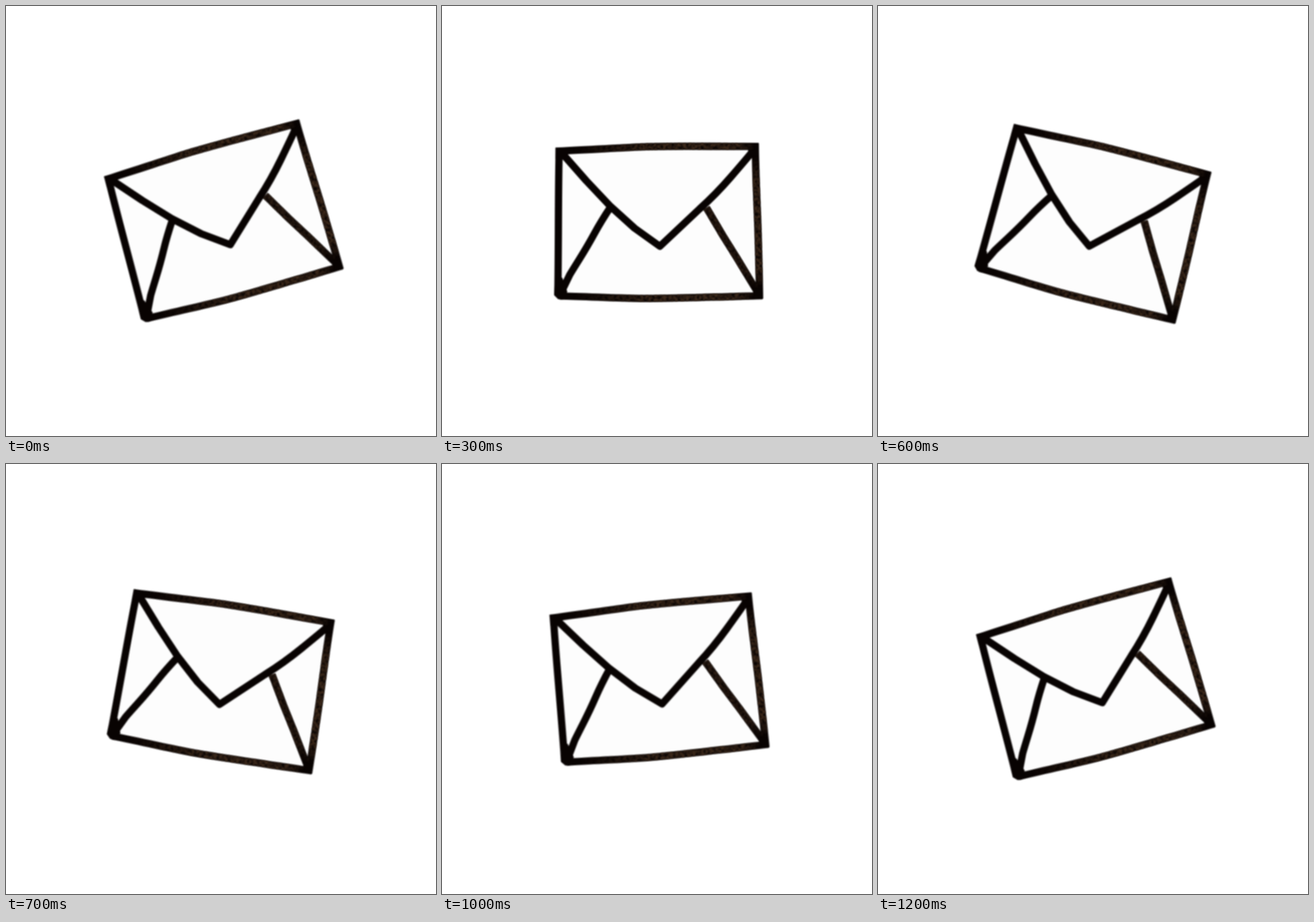
Animation of 748x748 px, one loop 1310 ms. Source, as an HTML page without scripts:

```html
<!DOCTYPE html>
<html lang="en">
<head>
<meta charset="utf-8">
<title>Rocking envelope</title>
<style>
  html, body { margin: 0; width: 100%; height: 100%; overflow: hidden; background: #fff; }
  svg { display: block; width: 100vw; height: 100vh; }
  .envelope {
    transform-origin: 374px 374px;
    animation: rock 1310ms steps(6, jump-end) infinite;
  }
  /* six 5-degree steps each way, then a short hold */
  @keyframes rock {
    0% { transform: rotate(-15deg); }
    45.77% { transform: rotate(15deg); }
    91.57%, 100% { transform: rotate(-15deg); }
  }
  .paper { fill: #fdfdfd; }
  .ink { fill: none; stroke: #080302; stroke-width: 12.6; stroke-linejoin: round; }
  .blot { fill: #080302; stroke: none; }
  .worn { fill: none; stroke-width: 11.5; }
  stop { stop-color: #46301f; }
</style>
</head>
<body>
<svg viewBox="0 0 748 748">
  <defs>
    <filter id="soft" filterUnits="userSpaceOnUse" x="180" y="220" width="395" height="310" color-interpolation-filters="sRGB">
      <feGaussianBlur stdDeviation=".8"/>
    </filter>
    <filter id="grain" filterUnits="userSpaceOnUse" x="180" y="220" width="395" height="310" color-interpolation-filters="sRGB">
      <feTurbulence type="fractalNoise" baseFrequency=".2" numOctaves="2" seed="9"/>
      <feColorMatrix values="0 0 0 0 0  0 0 0 0 0  0 0 0 0 0  2.4 0 0 0 -.6" result="specks"/>
      <feComposite in="SourceGraphic" in2="specks" operator="in"/>
      <feGaussianBlur stdDeviation=".8"/>
    </filter>
    <linearGradient id="across" gradientUnits="userSpaceOnUse" x1="200" y1="0" x2="551" y2="0">
      <stop offset=".08" stop-opacity="0"/>
      <stop offset=".45" stop-opacity=".85"/>
      <stop offset=".9" stop-opacity=".85"/>
      <stop offset=".98" stop-opacity="0"/>
    </linearGradient>
    <linearGradient id="down" gradientUnits="userSpaceOnUse" x1="0" y1="245" x2="0" y2="505">
      <stop offset=".06" stop-opacity="0"/>
      <stop offset=".25" stop-opacity=".85"/>
      <stop offset=".82" stop-opacity=".85"/>
      <stop offset=".95" stop-opacity="0"/>
    </linearGradient>
    <path id="top" d="M198 252.500C240 251 300 247 350 245S460 244.500 550.500 244.300"/>
    <path id="right" d="M545 239C545.500 300 549 360 550 400S552 470 552.500 509"/>
    <path id="bottom" d="M205 504.500C250 505 300 508.500 345 508.700S480 506 557 504"/>
    <path id="fold" d="M460 351L489 400L514 440L549 498"/>
  </defs>
  <g class="envelope">
    <path class="paper" d="M203 251L545 244L553 504L345 509L202 504Z"/>
    <g class="ink" filter="url(#soft)">
      <use href="#top"/>
      <use href="#right"/>
      <use href="#bottom"/>
      <use href="#fold"/>
      <path d="M204 247C202 310 203 400 201.500 502"/>
      <path d="M207 254L251 304L293 348.500L335 386.500L379 418L448 353Q476 328 502 298T542 251"/>
      <path d="M293 350Q277 374 265 396T238 442T222 468T207 499"/>
      <path class="blot" d="M197.500 246.500L220 248L216 258L207 268L197.500 266Z
        M530 239L550.500 238L551 262L541 264L533 254Z
        M209 472L218 497L210 511L202 510L195 503L196 486Z
        M547 478L557.500 486L558 510L538 509L541 499Z"/>
    </g>
    <g class="worn" filter="url(#grain)">
      <use href="#top" stroke="url(#across)"/>
      <use href="#bottom" stroke="url(#across)"/>
      <use href="#right" stroke="url(#down)"/>
      <use href="#fold" stroke="url(#down)" opacity=".7"/>
    </g>
  </g>
</svg>
</body>
</html>
```
